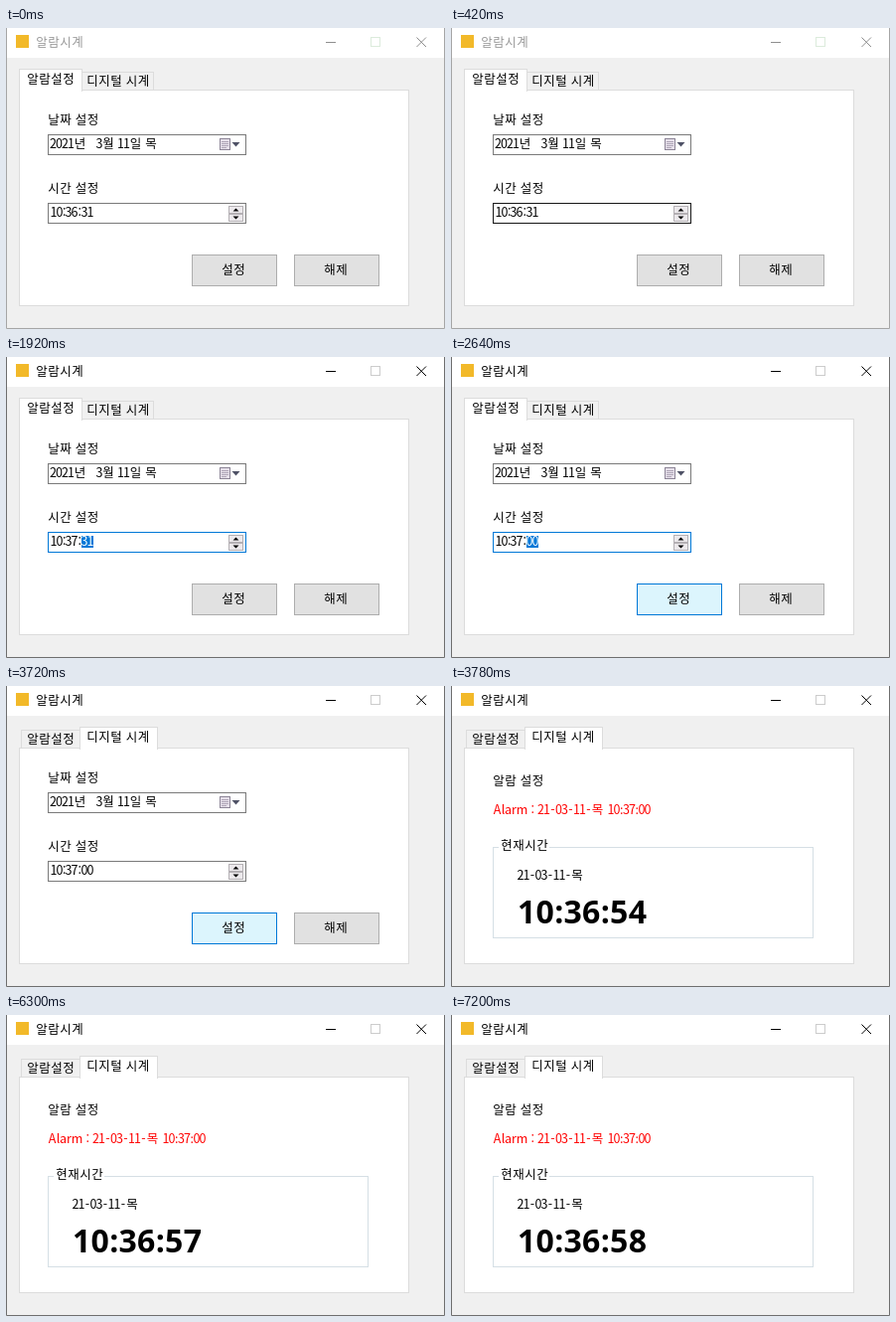
Animation of 442 by 303 pixels, one loop 8000 ms. Source, as an HTML page:

```html
<!DOCTYPE html>
<html lang="ko">
<head>
<meta charset="utf-8">
<title>알람시계</title>
<style>
html, body { margin: 0; width: 100%; height: 100%; overflow: hidden; background: #f0f0f0; }
svg { display: block; }
text { font: 12.5px "Noto Sans CJK KR", "Noto Sans CJK JP", "Noto Sans CJK", sans-serif; white-space: pre; text-anchor: middle; }
.clock { font: bold 32px "Open Sans", "Noto Sans", sans-serif; letter-spacing: .3px; text-anchor: start; }
</style>
</head>
<body>
<svg id="stage" width="442" height="303" viewBox="0 0 442 303"></svg>
<script>
const LOOP = 8000;
const BLUE = '#0078d7', LINE = '#dcdcdc';
const stage = document.getElementById('stage');

// Glyph advances of the form's bitmap-style type
const ADVANCE = { ':': 3.5, ' ': 3.5, A: 9, l: 3, a: 7, r: 5, m: 11 };
const advance = c => ADVANCE[c] ?? (c >= '가' ? 12 : 6);

// Each glyph is centred in its own cell
function label(x, y, str, fill = '#000') {
  const xs = [];
  for (const c of str) {
    const w = advance(c);
    xs.push(x + w / 2);
    x += w;
  }
  return `<text x="${xs.join(' ')}" y="${y}" fill="${fill}">${str}</text>`;
}

const fillRect = (x, y, w, h, fill) =>
  `<rect x="${x}" y="${y}" width="${w}" height="${h}" fill="${fill}"/>`;

const box = (x, y, w, h, fill, stroke) =>
  `<rect x="${x + .5}" y="${y + .5}" width="${w - 1}" height="${h - 1}" fill="${fill}" stroke="${stroke}"/>`;

const path = (d, fill, stroke = 'none') => `<path d="${d}" fill="${fill}" stroke="${stroke}"/>`;

function frame(active) {
  const ink = active ? '#000' : '#8f8f8f';
  const edge = active ? '#6e6e6e' : '#a6a6a6';
  return fillRect(0, 0, 442, 303, '#f0f0f0') + fillRect(0, 0, 442, 30, '#fff') +
    path('M.5 0V302.5H441.5V0', 'none', edge) +
    fillRect(10, 7, 13, 13, '#f2b929') +
    label(30, 18.5, '알람시계', active ? '#000' : '#999') +
    path('M322 14.5H332', 'none', ink) +
    box(367, 9, 10, 10, 'none', active ? '#ccc' : '#dcebdc') +
    path('M413.5 9.5L423 19M423 9.5L413.5 19', 'none', ink);
}

function tabs(second) {
  const page = box(13, 62, 393, 218, '#fff', LINE);
  const tab = (x, w, on, str, tx) =>
    box(x, on ? 41 : 44, w, on ? 23 : 19, on ? '#fff' : '#f0f0f0', LINE) +
    (on ? fillRect(x + 1, 62, w - 2, 2, '#fff') : '') +
    label(tx, on ? 55.5 : 58, str);
  const first = second ? tab(15, 60, false, '알람설정', 21) : tab(13, 64, true, '알람설정', 21);
  const last = second ? tab(74, 79, true, '디지털 시계', 81) : tab(76, 73, false, '디지털 시계', 81);
  return page + (second ? first + last : last + first);
}

function button(x, str, tx, hot) {
  return box(x, 228, 86, 32, hot ? '#dcf5fd' : '#e1e1e1', hot ? BLUE : '#adadad') +
    label(tx, 247.5, str);
}

function calendar() {
  return box(215, 111, 11, 12, '#e6e0ea', '#8c8496') +
    path('M217 114.5H224M217 116.5H224M217 118.5H224M217 120.5H222', 'none', '#b0a6b8') +
    path('M227.5 115H235.5L231.5 119.5Z', '#4f5266');
}

function spinner() {
  return box(224, 179, 15, 8, '#ece9ec', '#b4b0b4') + box(224, 187, 15, 8, '#ece9ec', '#b4b0b4') +
    path('M228.5 184.5H234.5L231.5 181.5ZM228.5 189.5H234.5L231.5 192.5Z', '#000');
}

function timeField({ border, min, sec, pick }) {
  const part = (x, str, on) => (on ? fillRect(x, 180, 12, 12, BLUE) : '') +
    label(x + 12 - 6 * str.length, 190, str, on ? '#fff' : '#000');
  return box(42, 176, 200, 21, '#fff', border) +
    part(45, '10') + label(57, 190, ':') +
    part(60, min, pick === 'min') + label(72.5, 190, ':') +
    part(76, sec, pick === 'sec') + spinner();
}

function setupPage(s) {
  return label(42, 96.5, '날짜 설정') +
    box(42, 107, 200, 21, '#fff', '#7a7a7a') +
    label(44.5, 121, '2021년   3월 11일 목') + calendar() +
    label(42, 165.5, '시간 설정') + timeField(s) +
    button(187, '설정', 217, s.hot) + button(290, '해제', 320, false);
}

function clockPage(sec) {
  return label(42, 100, '알람 설정') +
    label(42, 129, 'Alarm :', '#f00') +
    label(87.5, 129, '21-03-11-목', '#f00') +
    label(158, 129, '10:37:00', '#f00') +
    box(42, 162, 323, 92, 'none', '#d5dfe5') + fillRect(48, 160, 51, 5, '#fff') +
    label(50, 164.5, '현재시간') +
    label(67, 194.5, '21-03-11-목') +
    `<text class="clock" x="67" y="239">10:36:${sec}</text>`;
}

// Each step lists only what changes
const STEPS = [
  [0, { active: false, border: '#7a7a7a', min: '36', sec: '31', pick: '', hot: false, tab: 0, clock: 0 }],
  [420, { border: '#171717' }],
  [660, { active: true, border: BLUE, pick: 'min' }],
  [1260, { min: '3' }],
  [1380, { min: '37' }],
  [1920, { pick: 'sec' }],
  [2220, { sec: '0' }],
  [2460, { sec: '00' }],
  [2640, { hot: true }],
  [3720, { tab: 1, pick: '', border: '#7a7a7a' }],
  [3780, { clock: 54 }],
  [4500, { clock: 55 }],
  [5400, { clock: 56 }],
  [6300, { clock: 57 }],
  [7200, { clock: 58 }]
];

let shown = -1;
function render(ms) {
  const n = STEPS.filter(([at]) => at <= ms).length;
  if (n === shown) return;
  shown = n;
  const s = Object.assign({}, ...STEPS.slice(0, n).map(([, change]) => change));
  stage.innerHTML = frame(s.active) + tabs(s.tab) +
    (s.clock ? clockPage(s.clock) : setupPage(s));
}

const start = performance.now();
function tick() {
  render((performance.now() - start) % LOOP);
  requestAnimationFrame(tick);
}
tick();
</script>
</body>
</html>
```
